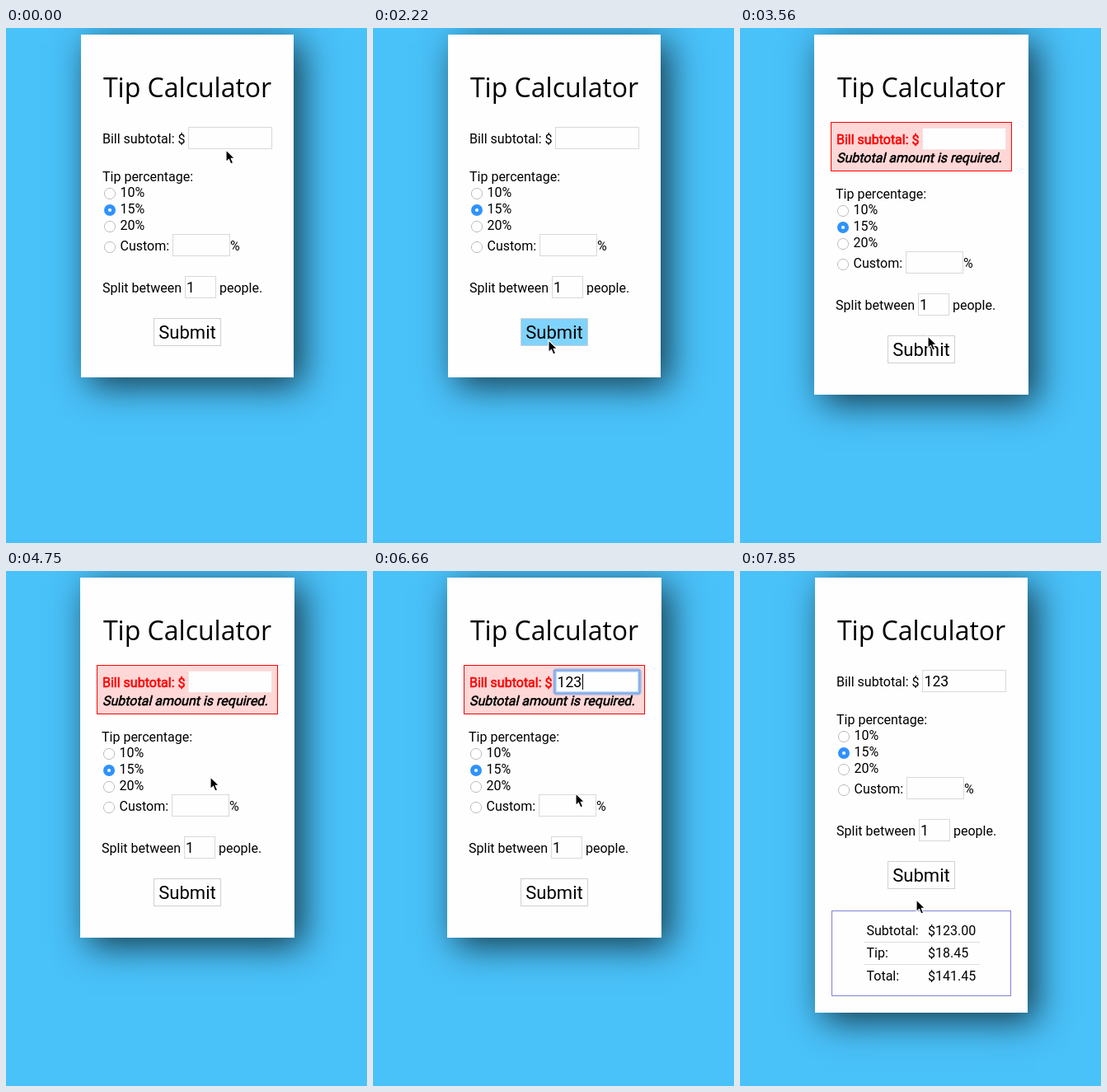
These frames come from a looping animation (438 by 625 pixels, 8 s). An HTML page:

```html
<!DOCTYPE html>
<html lang="en">
<head>
<meta charset="utf-8">
<title>Tip Calculator</title>
<style>
  html, body { margin: 0; width: 100%; height: 100%; overflow: hidden; background: #49c1f9; }
  #card { position: absolute; top: 8px; background: #fefefe; box-shadow: 10px 10px 40px rgba(0, 0, 0, .7); }
  svg { position: absolute; left: 0; top: 0; }
  text { font: 16px Roboto, sans-serif; white-space: pre; }
  .title { font: 32px "Open Sans", "Noto Sans", sans-serif; text-anchor: middle; }
  .value { font-size: 17.6px; }
  .submit { font-size: 22px; text-anchor: middle; }
  .heavy { stroke-width: .55px; }
  .field { fill: #fefefe; stroke: #d9d9d9; }
</style>
</head>
<body>
<div id="card"></div>
<svg width="438" height="625" viewBox="0 0 438 625">
  <text class="title" x="220" y="83.5">Tip Calculator</text>

  <g id="alert">
    <rect x="110.5" y="114.5" width="219" height="59" fill="#ffd7d7" stroke="#f00"/>
    <text class="heavy" stroke="#000" transform="translate(117 163) skewX(-13)">Subtotal amount is required.</text>
  </g>
  <g id="bill">
    <text id="billLabel" x="117" y="140">Bill subtotal: $</text>
    <rect id="billField" class="field" x="221.5" y="120.5" width="101" height="26"/>
    <g id="glow" fill="none" stroke="#6aa5ee">
      <rect x="220.5" y="119.5" width="103" height="28" rx="2" stroke-width="5" opacity=".4"/>
      <rect x="220.5" y="119.5" width="103" height="28" rx="1" stroke-width="2" opacity=".8"/>
    </g>
    <text id="amount" class="value" x="223.5" y="140"></text>
    <rect id="caret" x="254" y="124" width="1" height="19"/>
  </g>

  <g id="form">
    <text x="117" y="186">Tip percentage:</text>
    <g id="radios"></g>
    <rect class="field" x="202.5" y="250.5" width="69" height="26"/>
    <text x="272" y="270">%</text>
    <text x="117" y="321">Split between</text>
    <rect class="field" x="217.5" y="301.5" width="37" height="26"/>
    <text class="value" x="219" y="321">1</text>
    <text x="259" y="321">people.</text>
  </g>

  <g id="submit">
    <rect id="ring" x="176.5" y="349.5" width="87" height="38" fill="#fefefe" stroke="#a3a3a3"/>
    <rect id="button" x="179.5" y="352.5" width="81" height="33" stroke="#d0d0d0"/>
    <text class="submit" x="220" y="377">Submit</text>
  </g>

  <g id="result">
    <rect x="111.5" y="412.5" width="217" height="103" fill="none" stroke="#00a" stroke-dasharray="1"/>
    <path d="M150 450.5H291M150 477.5H291" stroke="#ddd"/>
  </g>

  <g id="arrow">
    <path d="M0 0V14.5L3.4 11.4L5.8 17L8.6 15.8L6.2 10.4H10.6Z" fill="#000" stroke="#fff" stroke-width="1.1"/>
  </g>
  <g id="beam" fill="none">
    <path d="M-3.5 -7.5Q0 -7.5 0 -5V5Q0 7.5 -3.5 7.5M3.5 -7.5Q0 -7.5 0 -5V5Q0 7.5 3.5 7.5M-2 2.5H2" stroke="#fff" stroke-width="2.4" opacity=".6"/>
    <path d="M-3.5 -7.5Q0 -7.5 0 -5V5Q0 7.5 -3.5 7.5M3.5 -7.5Q0 -7.5 0 -5V5Q0 7.5 3.5 7.5M-2 2.5H2" stroke="#000"/>
  </g>
</svg>
<script>
const LOOP = 8000;
const WHITE = '#fefefe', LIGHT = '#7fd3fc', BLUE = '#49c1f9';
const el = id => document.getElementById(id);

function add(parent, tag, attrs, text = '') {
  const node = document.createElementNS('http://www.w3.org/2000/svg', tag);
  for (const key in attrs) node.setAttribute(key, attrs[key]);
  node.textContent = text;
  el(parent).append(node);
}

[['10%', 201], ['15%', 221], ['20%', 241], ['Custom:', 266]].forEach(([label, cy]) => {
  const on = label === '15%';
  add('radios', 'circle', { cx: 126, cy, r: on ? 7 : 6.6, fill: on ? '#2f92fc' : '#fefefe', stroke: on ? 'none' : '#bdbdbd' });
  if (on) add('radios', 'circle', { cx: 126, cy, r: 2.1, fill: '#fff' });
  add('radios', 'text', { x: 138.5, y: cy + 4 }, label);
});

[['Subtotal:', '$123.00', 442], ['Tip:', '$18.45', 469], ['Total:', '$141.45', 497]].forEach(([label, sum, y]) => {
  add('result', 'text', { x: 153.5, y }, label);
  add('result', 'text', { x: 228, y }, sum);
});

// Each step: time, pointer x, pointer y, and whatever else changes from then on.
const steps = [
  [0, 267, 148, { mode: 'empty', pointer: 'arrow', fill: WHITE, ring: false, glow: false, amount: '', caret: false }],
  [450, 263, 140, { pointer: 'beam' }],
  [600, 254, 157, { pointer: 'arrow' }],
  [745, 240, 200],
  [890, 230, 252],
  [1040, 225, 291],
  [1190, 198, 308],
  [1335, 163, 318],
  [1480, 145, 320],
  [1920, 168, 342],
  [2070, 200, 370, { fill: '#d9f1fe' }],
  [2220, 213, 379, { fill: LIGHT }],
  [2370, 223, 376, { fill: BLUE }],
  [2520, 228, 374],
  [2960, 228, 374, { ring: true }],
  [3560, 228, 374, { mode: 'error', fill: WHITE, ring: false }],
  [4310, 231, 356],
  [4460, 238, 310],
  [4610, 248, 250],
  [4755, 256, 200],
  [4900, 260, 172],
  [5045, 262, 142, { pointer: 'beam' }],
  [5190, 262, 142, { glow: true }],
  [5780, 256, 145],
  [5930, 256, 145, { pointer: 'none', amount: '1' }],
  [6080, 256, 145, { amount: '12' }],
  [6225, 256, 145, { amount: '123', caret: true }],
  [6370, 262, 180, { pointer: 'arrow' }],
  [6520, 246, 270],
  [6665, 226, 360],
  [6810, 214, 399, { fill: '#d9f1fe' }],
  [6960, 214, 399, { fill: LIGHT, caret: false }],
  [7110, 214, 399, { fill: BLUE }],
  [7410, 214, 399, { ring: true, glow: false }],
  [7850, 214, 399, { mode: 'result', fill: WHITE, ring: false }],
];

let last = {};
const states = steps.map(([time, x, y, change]) => (last = { ...last, time, x, y, ...change }));

const show = (id, on) => el(id).setAttribute('visibility', on ? 'visible' : 'hidden');
const move = (id, x, y) => el(id).setAttribute('transform', `translate(${x} ${y})`);

function draw(s) {
  const error = s.mode === 'error';
  const card = el('card').style;
  card.left = (error ? 90 : 91) + 'px';
  card.width = (error ? 260 : 258) + 'px';
  card.height = { empty: 416, error: 437, result: 528 }[s.mode] + 'px';

  move('bill', 0, error ? 1 : 0);
  move('form', error ? -1 : 0, error ? 21 : 0);
  move('submit', 0, error ? 21 : 0);
  el('billLabel').setAttribute('class', error ? 'heavy' : '');
  el('billLabel').style.fill = error ? '#f00' : '#000';
  el('billLabel').style.stroke = error ? '#f00' : 'none';
  el('billField').style.stroke = error ? '#f3e3e3' : '';
  el('button').setAttribute('fill', s.fill);
  el('amount').textContent = s.amount;

  show('alert', error);
  show('result', s.mode === 'result');
  for (const id of ['glow', 'caret', 'ring']) show(id, s[id]);
  for (const id of ['arrow', 'beam']) {
    show(id, s.pointer === id);
    move(id, s.x, s.y);
  }
}

let current;
function tick() {
  const time = performance.now() % LOOP;
  const state = states.findLast(s => s.time <= time);
  if (state !== current) draw(current = state);
  requestAnimationFrame(tick);
}
tick();
</script>
</body>
</html>
```
